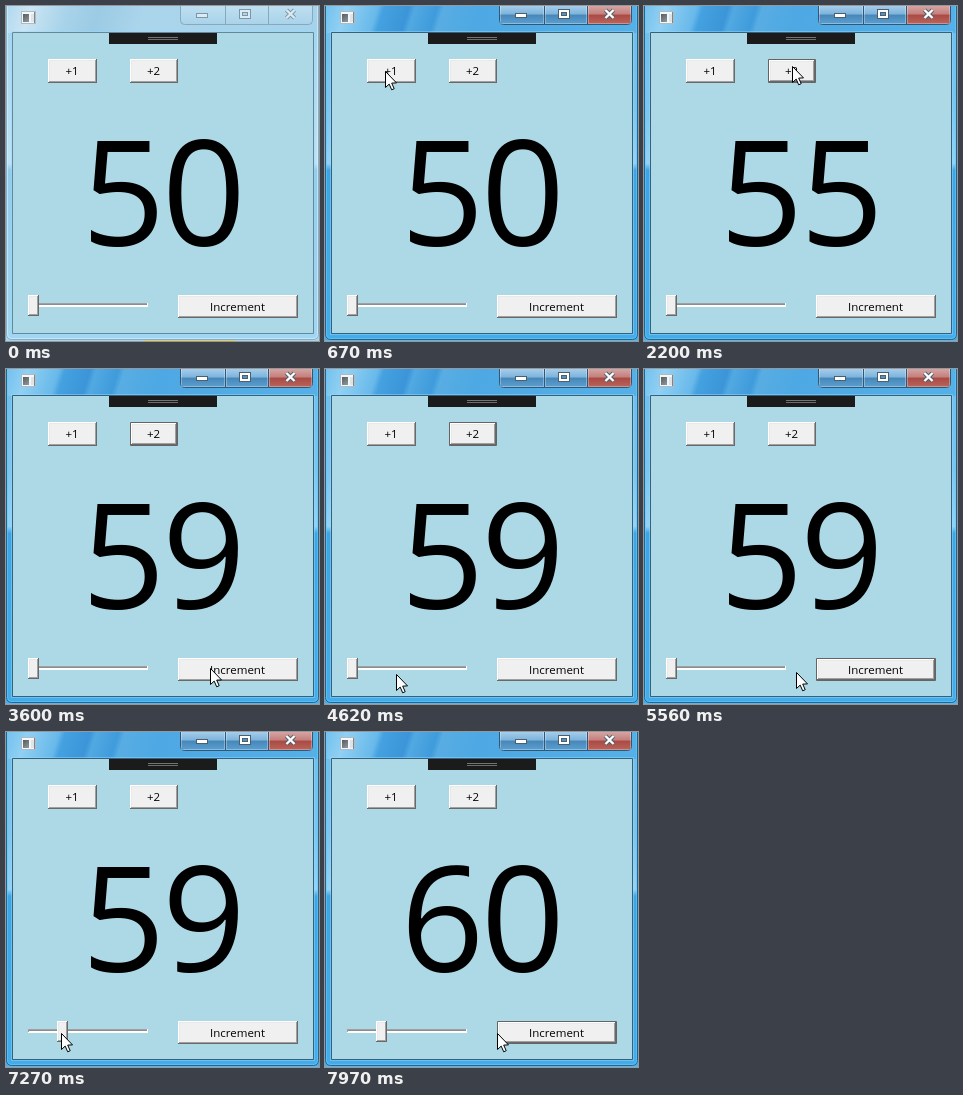
Write an HTML page with a canvas that moves like this. It is 313 px wide and 335 px high and loops after 8 s.

```html
<!DOCTYPE html>
<html lang="en">
<head>
<meta charset="utf-8">
<title>Counter window</title>
<style>
html, body { margin: 0; width: 100%; height: 100%; overflow: hidden; }
canvas { display: block; }
</style>
</head>
<body>
<canvas id="stage" width="313" height="335"></canvas>
<script>
const ctx = document.getElementById('stage').getContext('2d');
const LOOP = 8000;
const FONT = '"Open Sans", "Noto Sans", sans-serif';

// Pointer moves: start, end, number of steps, target x, target y
const START = [171, 228];
const moves = [
  [144, 440, 5, 60, 65],
  [1590, 1970, 6, 148, 60],
  [3290, 3600, 5, 204, 299],
  [3920, 4310, 6, 33, 302],
  [4540, 4690, 3, 90, 306],
  [4770, 5000, 4, 190, 303],
  [5470, 5560, 2, 152, 303],
  [5640, 5940, 5, 17, 299],
  [6110, 6260, 3, 27, 299],
  [6410, 6580, 3, 35, 300],
  [6660, 6730, 2, 40, 300],
  [6890, 7120, 4, 56, 300],
  [7270, 7270, 1, 55, 301],
  [7420, 7590, 3, 172, 301]
];

// Presses: down, up, button, value afterwards
const presses = [
  [740, 820, 'one', 51],
  [1050, 1130, 'one', 52],
  [1280, 1360, 'one', 53],
  [2120, 2200, 'two', 55],
  [2520, 2600, 'two', 57],
  [2910, 2980, 'two', 59],
  [5160, 5240, 'inc', 59],
  [7820, 7970, 'inc', 60]
];
const ACTIVATE = 670, ENTER = 70, DRAG = 6410, DROP = 7270;

const smooth = p => p * p * (3 - 2 * p);

function pointerAt(t) {
  let [x, y] = START;
  for (const [from, to, n, tx, ty] of moves) {
    if (t < from) break;
    const gap = n > 1 ? (to - from) / (n - 1) : 1;
    const step = Math.min(n, Math.floor((t - from) / gap + 1e-6) + 1);
    const p = n > 3 ? smooth(step / n) : step / n;
    x += (tx - x) * p;
    y += (ty - y) * p;
  }
  return [Math.round(x), Math.round(y)];
}

function stateAt(t) {
  const s = { value: 50, focus: '', down: '', active: t >= ACTIVATE };
  for (const [from, to, name, value] of presses) {
    if (t < from) break;
    s.value = value;
    s.focus = t >= DRAG && from < DRAG ? '' : name;
    s.down = t < to ? name : '';
  }
  s.pointer = pointerAt(t);
  s.thumb = t < DRAG ? 22 : Math.max(22, pointerAt(Math.min(t, DROP - 1))[0] - 5);
  return s;
}

function box(x, y, w, h, fill) {
  ctx.fillStyle = fill;
  ctx.fillRect(x, y, w, h);
}

function outline(x, y, w, h, color, radius = 0) {
  ctx.strokeStyle = color;
  ctx.lineWidth = 1;
  ctx.beginPath();
  ctx.roundRect(x + 0.5, y + 0.5, w - 1, h - 1, radius);
  ctx.stroke();
}

function ramp(x0, y0, x1, y1, stops) {
  const g = ctx.createLinearGradient(x0, y0, x1, y1);
  for (const [at, color] of stops) g.addColorStop(at, color);
  return g;
}

function edges(x, y, w, h, light, dark) {
  box(x, y, w - 1, 1, light);
  box(x, y, 1, h - 1, light);
  box(x, y + h - 1, w, 1, dark);
  box(x + w - 1, y, 1, h, dark);
}

function raised(x, y, w, h) {
  box(x, y, w, h, '#f0f0f0');
  edges(x, y, w, h, '#ffffff', '#696969');
  edges(x + 1, y + 1, w - 2, h - 2, '#e9e9e9', '#a0a0a0');
}

function button(x, y, w, h, label, focused, down) {
  if (down) {
    box(x, y, w, h, '#f0f0f0');
    outline(x, y, w, h, '#646464');
    outline(x + 1, y + 1, w - 2, h - 2, '#a0a0a0');
  } else if (focused) {
    raised(x + 1, y + 1, w - 2, h - 2);
    outline(x, y, w, h, '#646464');
  } else {
    raised(x, y, w, h);
  }
  const shift = down ? 1 : 0;
  ctx.font = '11.5px ' + FONT;
  ctx.fillStyle = '#000';
  ctx.fillText(label, x + w / 2 - 0.5 + shift, y + 16 + shift);
}

function caption(x, w, active, red) {
  const glass = active
    ? red
      ? [[0, '#d5a5a3'], [0.45, '#c47f7c'], [0.5, '#a94a44'], [1, '#b9655c']]
      : [[0, '#a5cdea'], [0.45, '#7db3dc'], [0.5, '#4787b8'], [1, '#5a9fd0']]
    : [[0, '#bfdff0'], [1, '#a9d3ea']];
  ctx.beginPath();
  ctx.roundRect(x + 0.5, -4.5, w, 23, x < 180 ? [0, 0, 0, 4] : red ? [0, 0, 4, 0] : 0);
  ctx.fillStyle = ramp(0, 0, 0, 18, glass);
  ctx.fill();
  ctx.strokeStyle = active ? '#2f5876' : '#86a9bd';
  ctx.lineWidth = 1;
  ctx.stroke();
  if (active) {
    ctx.strokeStyle = 'rgba(255,255,255,.3)';
    ctx.strokeRect(x + 1.5, -3.5, w - 2, 21);
  }
}

function glyphs(active) {
  const fill = active ? '#fff' : '#d9ebf5';
  const line = active ? '#4c5f6e' : '#7d95a5';
  box(190, 7, 12, 5, line);
  box(191, 8, 10, 3, fill);
  box(233, 3, 12, 10, line);
  box(234, 4, 10, 8, fill);
  box(236, 6, 6, 4, line);
  box(237, 7, 4, 2, active ? '#5592bd' : '#b0d6ea');
  for (const [color, width] of [[line, 4.2], [fill, 2.4]]) {
    ctx.strokeStyle = color;
    ctx.lineWidth = width;
    ctx.beginPath();
    ctx.moveTo(280.5, 4); ctx.lineTo(288.5, 12);
    ctx.moveTo(288.5, 4); ctx.lineTo(280.5, 12);
    ctx.stroke();
  }
}

function frame(active) {
  const side = active
    ? [[0, '#6fbdea'], [0.3, '#7cc5ef'], [0.47, '#93d2f5'], [0.49, '#3fa4e4'], [1, '#46ace9']]
    : [[0, '#a3d2ec'], [0.47, '#bfe2f4'], [0.49, '#93cbea'], [1, '#a2d6f0']];
  box(0, 0, 313, 335, ramp(0, 0, 0, 335, side));
  const top = active
    ? [[0, '#72c0ee'], [0.07, '#90d0f3'], [0.17, '#68b9ea'], [0.19, '#45a1e0'],
       [0.27, '#3b95d8'], [0.29, '#52a9e2'], [0.36, '#3f9bdb'], [0.38, '#58ade3'],
       [0.5, '#4da8e3'], [1, '#55b0e8']]
    : [[0, '#b0d8ee'], [0.08, '#cbe5f3'], [0.2, '#a8d3ea'], [0.3, '#9ccbe5'],
       [0.45, '#abd5eb'], [1, '#a5d3ec']];
  box(0, 0, 313, 27, ramp(0, 0, 285, 90, top));

  // Glass rim
  const rim = active ? '#2b6388' : '#83aec6';
  const glow = active ? 'rgba(90,205,255,.6)' : 'rgba(215,243,255,.6)';
  outline(0, -8, 313, 342, rim, 5);
  outline(1, -8, 311, 341, glow, 4);
  box(0, 334, 313, 1, active ? '#5eb4e6' : '#a2d6f0');
  if (!active) box(138, 334, 92, 1, '#d9cf6a');
  outline(5, 25, 304, 304, 'rgba(150,220,255,.45)');
  outline(6, 26, 302, 302, active ? '#35617c' : '#64889b');

  caption(174, 45, active);
  caption(219, 43, active);
  caption(262, 44, active, true);
  glyphs(active);

  // App icon
  box(15, 5, 15, 13, '#aebbc4');
  box(16, 6, 13, 11, '#f4f7f9');
  box(17, 8, 6, 8, ramp(17, 8, 23, 16, [[0, '#555d61'], [1, '#92999c']]));
  box(25, 8, 3, 8, '#dfe4e7');
  box(28, 6, 1, 11, '#7c868c');
}

function toolbar() {
  box(103, 27, 108, 11, '#1b1b1c');
  box(142, 31, 30, 1, '#747474');
  box(142, 33, 30, 1, '#6c6c6c');
}

function slider(x) {
  box(22, 297, 120, 4, '#ffffff');
  edges(22, 297, 120, 4, '#a0a0a0', '#ffffff');
  box(23, 298, 118, 1, '#8c8c8c');
  raised(x, 289, 11, 21);
}

function pointer(x, y) {
  ctx.beginPath();
  [[0, 0], [0, 16], [3.7, 12.6], [6.2, 18.3], [8.7, 17.2], [6.2, 11.6], [11, 11.4]]
    .forEach(([dx, dy]) => ctx.lineTo(x + dx + 0.5, y + dy + 0.5));
  ctx.closePath();
  ctx.fillStyle = '#fff';
  ctx.fill();
  ctx.strokeStyle = '#000';
  ctx.lineWidth = 1;
  ctx.stroke();
}

function draw(t) {
  const s = stateAt(t);
  frame(s.active);
  box(7, 27, 300, 300, '#add8e6');
  toolbar();
  ctx.textAlign = 'center';
  const put = (name, x, y, w, h, label) =>
    button(x, y, w, h, label, s.focus === name, s.down === name);
  put('one', 42, 53, 49, 24, '+1');
  put('two', 124, 53, 48, 24, '+2');
  put('inc', 172, 289, 120, 23, 'Increment');
  ctx.font = '146.5px ' + FONT;
  ctx.fillStyle = '#000';
  [...String(s.value)].forEach((digit, i) => ctx.fillText(digit, 117.5 + 80.3 * i, 240));
  slider(s.thumb);
  if (t >= ENTER) pointer(...s.pointer);
}

const begin = performance.now();
function tick() {
  draw((performance.now() - begin) % LOOP);
  requestAnimationFrame(tick);
}
tick();
</script>
</body>
</html>
```
